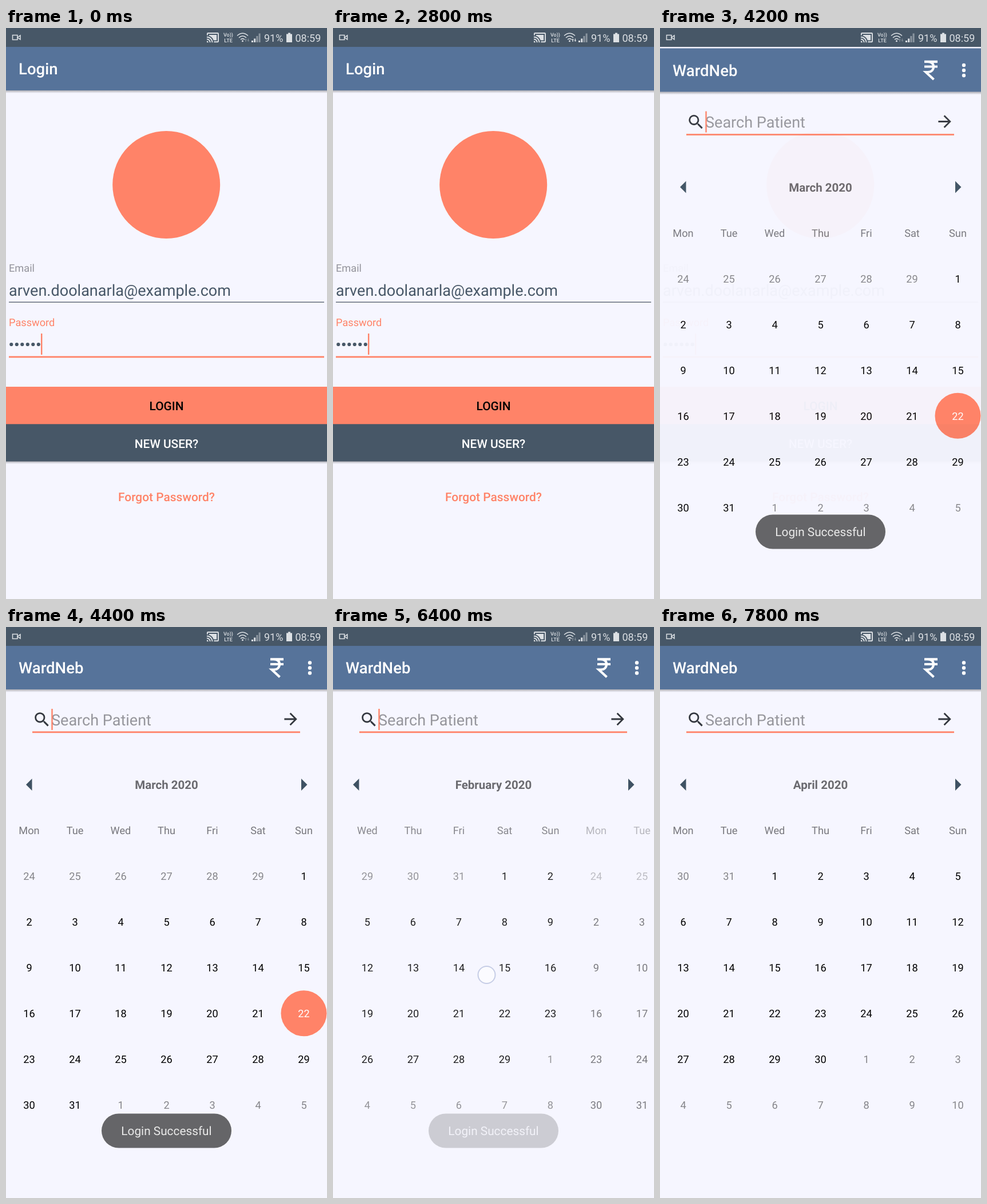
An HTML page that plays this animation: 561 px wide and 998 px high, repeating every 8 s.

```html
<!DOCTYPE html>
<html lang="en">
<head>
<meta charset="utf-8">
<title>Patient login and calendar</title>
<style>
  html, body { margin: 0; width: 100%; height: 100%; overflow: hidden; background: #f6f6ff; }
  svg { display: block; font-family: Roboto, sans-serif; text-rendering: geometricPrecision; }
  .bar { fill: #56739a; }
  .dark { fill: #475767; }
  .coral { fill: #ff8368; }
  .mid { text-anchor: middle; }
  .head { font-size: 27.5px; font-weight: 500; fill: #fff; }
  .btn { font-size: 20.9px; font-weight: 500; text-anchor: middle; }
  .small { font-size: 18.2px; }
  .input { font-size: 27.05px; }
  .stat { font-size: 18px; fill: #dce0e4; }
  .line { fill: none; stroke: #dce0e4; }
  .icon { fill: #dce0e4; }
</style>
</head>
<body>
<svg width="561" height="998" viewBox="0 0 561 998">
  <defs>
    <linearGradient id="shade" x2="0" y2="1">
      <stop stop-color="#000" stop-opacity=".3"/>
      <stop offset="1" stop-color="#000" stop-opacity="0"/>
    </linearGradient>
    <g id="appbar">
      <rect width="561" height="998" fill="#f6f6ff"/>
      <rect y="33" width="561" height="76" class="bar"/>
      <rect y="109" width="561" height="5" fill="url(#shade)"/>
    </g>
  </defs>

  <g id="login">
    <use href="#appbar"/>
    <text x="22" y="81.3" class="head">Login</text>
    <circle cx="280.2" cy="274" r="94" class="coral"/>
    <text x="5" y="426" class="small" fill="#93939b">Email</text>
    <text x="5" y="468" class="input" fill="#475767">arven.doolanarla@example.com</text>
    <rect x="5" y="478.5" width="551" height="1.4" fill="#5b6570"/>
    <text x="5" y="521" class="small coral">Password</text>
    <g id="dots" class="dark"></g>
    <rect id="passCaret" x="61" y="534" width="2.4" height="37" class="coral"/>
    <rect x="5" y="573.5" width="551" height="2.8" class="coral"/>
    <rect y="757" width="561" height="5" fill="url(#shade)"/>
    <rect y="627" width="561" height="66" class="coral"/>
    <rect y="692.3" width="561" height="65.2" class="dark"/>
    <text x="280.5" y="668" class="btn">LOGIN</text>
    <text x="280.5" y="733.5" class="btn" fill="#fff">NEW USER?</text>
    <text x="280.5" y="826.5" class="btn coral">Forgot Password?</text>
    <circle id="spinner" cx="280.5" cy="948.5" r="16.6" fill="none" stroke="#ff8368" stroke-width="3.6" pathLength="100"/>
  </g>

  <g id="home">
    <use href="#appbar"/>
    <text x="22" y="81.3" class="head">WardNeb</text>
    <path d="M462 56.3H485M462 65H485M462 56.3H468C475 56.3 478 60 478 65S475 74.5 468 74.5H464.5L478.5 87.5" fill="none" stroke="#fff" stroke-width="4.2"/>
    <g fill="#fff">
      <circle cx="531" cy="62.5" r="3.2"/><circle cx="531" cy="71.5" r="3.2"/><circle cx="531" cy="80.5" r="3.2"/>
    </g>
    <g fill="#33373e">
      <path transform="translate(46 145) scale(1.4)" d="M15.5 14h-.79l-.28-.27A6.47 6.47 0 0 0 16 9.5 6.5 6.5 0 1 0 9.5 16c1.61 0 3.09-.59 4.23-1.57l.27.28v.79l5 4.99L20.49 19l-4.99-5zm-6 0a4.5 4.5 0 1 1 0-9 4.5 4.5 0 0 1 0 9z"/>
      <path transform="translate(480.8 144.2) scale(1.4)" d="M12 4l-1.41 1.41L16.17 11H4v2h12.17l-5.58 5.59L12 20l8-8z"/>
    </g>
    <text x="79" y="171.5" class="input" fill="#96969c">Search Patient</text>
    <rect id="searchCaret" x="79.3" y="143" width="2.4" height="37" class="coral"/>
    <rect x="46" y="182.4" width="468" height="2.8" class="coral"/>
    <path d="M35 275.5L45.5 265V286ZM526.5 275.5L516 265V286Z" fill="#3f5263"/>
    <text id="month" x="280.5" y="283" class="mid" font-size="20.5" font-weight="700" fill="#6a6a6f"></text>
    <g id="pages"></g>
  </g>

  <g id="status">
    <rect width="561" height="33" class="dark"/>
    <path class="line" stroke-width="1.5" d="M11.5 12.500H20V20.500H11.5ZM20 16.5L25 13V20Z"/>
    <path class="icon" transform="translate(350 5.2) scale(.955)" d="M1 18v3h3c0-1.66-1.34-3-3-3zm0-4v2c2.76 0 5 2.24 5 5h2c0-3.87-3.13-7-7-7zm18-7H5v1.63c3.96 1.28 7.09 4.41 8.37 8.37H19V7zM1 10v2c4.97 0 9 4.03 9 9h2c0-6.08-4.93-11-11-11zm20-7H3c-1.1 0-2 .9-2 2v3h2V5h18v14h-7v2h7c1.1 0 2-.9 2-2V5c0-1.1-.9-2-2-2z"/>
    <g class="mid icon" font-size="9" font-weight="500">
      <text x="388.5" y="15">Vo))</text><text x="388.5" y="25">LTE</text>
    </g>
    <path class="line" stroke-width="1.5" d="M404 13.5Q413.5 5 423 13.5M407 17Q413.5 11 420 17M410 20.3Q413.5 17 417 20.3"/>
    <circle cx="413.5" cy="22.8" r="1.5" class="icon"/>
    <path id="traffic" d="M417 21L419 18.5 421 21H419.7V24H418.3V21ZM421.5 21.5H422.7V18.5H424.1V21.5H425.4L423.4 24Z"/>
    <path class="icon" d="M429 22h3v3h-3ZM433.2 18.5h3V25h-3Z"/>
    <path fill="#8c96a0" d="M437.4 14h3V25h-3ZM441.6 9.5h3V25h-3Z"/>
    <text x="451" y="24" class="stat">91%</text>
    <path class="icon" d="M493 8.5h4v2h3V25H490V10.5h3Z"/>
    <text x="505.5" y="24" class="stat">08:59</text>
  </g>

  <g id="toast">
    <rect x="167" y="850.5" width="227" height="60" rx="30" fill="#636365"/>
    <text x="280.5" y="888" class="mid" font-size="20.8" fill="#eaeaea">Login Successful</text>
  </g>
  <circle id="finger" r="15" fill="#fbfbff" stroke="#c6cde6" stroke-width="2"/>
</svg>

<script>
const LOOP = 8000, PAGE = 560;
const $ = id => document.getElementById(id);
const ramp = (t, a, b) => Math.min(1, Math.max(0, (t - a) / (b - a)));
const easeOut = (x, n) => 1 - (1 - x) ** n;
const show = (el, on) => el.setAttribute('visibility', on ? 'inherit' : 'hidden');
const fade = (el, a) => el.setAttribute('opacity', a);
const move = (el, x, y) => el.setAttribute('transform', `translate(${x} ${y})`);

function add(parent, tag, attrs, text = '') {
  const el = document.createElementNS('http://www.w3.org/2000/svg', tag);
  for (const k in attrs) el.setAttribute(k, attrs[k]);
  el.textContent = text;
  parent.append(el);
  return el;
}

for (let i = 0; i < 6; i++) add($('dots'), 'circle', { cx: 9.3 + i * 9.5, cy: 553, r: 3.1 });

// Month pages, Monday first, six weeks each
const months = ['February', 'March', 'April'];
const weekdays = ['Mon', 'Tue', 'Wed', 'Thu', 'Fri', 'Sat', 'Sun'];
const pages = months.map((name, k) => {
  const page = add($('pages'), 'g', {});
  const month = k + 1;
  const lead = (new Date(2020, month, 1).getDay() + 6) % 7;
  const label = (i, y, fill, text) =>
    add(page, 'text', { x: 40.5 + 80 * (i % 7), y, fill, class: 'small mid' }, text);
  weekdays.forEach((d, i) => label(i, 362, '#77777c', d));
  for (let i = 0; i < 42; i++) {
    const date = new Date(2020, month, 1 - lead + i), day = date.getDate();
    const inside = date.getMonth() === month;
    const picked = inside && month === 2 && day === 22;
    const y = 442.3 + 80 * Math.floor(i / 7);
    if (picked) add(page, 'circle', { cx: 520.5, cy: y - 7, r: 40, class: 'coral' });
    label(i, y, picked ? '#fff' : inside ? '#000' : '#858589', day);
  }
  return page;
});

// Drag from one page position to another, then settle; the finger follows the page
const swipes = [
  { start: 5160, release: 5400, settled: 5800, turn: 5365, from: 1, drag: .4625, to: 0, x: 129, y: 620 },
  { start: 6180, release: 6520, settled: 6950, turn: 6520, from: 0, drag: .386, to: 1, x: 409, y: 608 },
  { start: 7130, release: 7330, settled: 7740, turn: 7330, from: 1, drag: 1.5, to: 2, x: 410, y: 612 }
];

function drawCalendar(t) {
  let pos = 1, finger = null, title = 1, shift = 0, alpha = 1;
  for (const s of swipes) {
    if (t >= s.start) {
      pos = s.from + (s.drag - s.from) * ramp(t, s.start, s.release);
      if (t <= s.release + 20) finger = [s.x - PAGE * (pos - s.from), s.y];
      pos += (s.to - s.drag) * easeOut(ramp(t, s.release, s.settled), 3);
    }
    if (t >= s.turn) {
      const dir = s.from - s.to, half = 250, out = t < s.turn + half;
      const e = easeOut(ramp(t, s.turn + (out ? 0 : half), s.turn + (out ? half : 2 * half)), 4);
      title = out ? s.from : s.to;
      shift = 31 * dir * (out ? e : e - 1);
      alpha = out ? 1 - e : e;
    }
  }
  pages.forEach((page, k) => {
    const d = k - pos;
    show(page, Math.abs(d) < 1);
    fade(page, Math.sqrt(Math.max(0, 1 - Math.abs(d))));
    move(page, d * PAGE, 0);
  });
  $('month').textContent = months[title] + ' 2020';
  move($('month'), 0, shift);
  fade($('month'), alpha);
  return finger;
}

function drawSpinner(t) {
  const el = $('spinner'), u = (t - 300) / 1333;
  const wave = .5 - .5 * Math.cos(2 * Math.PI * u);
  const len = 6 + 66 * wave;
  el.setAttribute('stroke-dasharray', `${len} ${100 - len}`);
  el.setAttribute('transform', `rotate(${u * 500 - 90} 280.5 948.5)`);
  show(el, t >= 300 && t < 2700);
}

function draw(t) {
  const blink = shift => (t + shift) % 1000 < 500;
  show($('passCaret'), t >= 2600 || blink(400));
  show($('searchCaret'), blink(900));
  $('traffic').setAttribute('fill', t >= 600 && t < 4000 ? '#dce0e4' : '#7f8a95');
  drawSpinner(t);

  const enter = easeOut(ramp(t, 4030, 4280), 3);
  show($('home'), enter > 0);
  fade($('home'), enter);
  move($('home'), 0, 80 * (1 - enter));

  fade($('toast'), Math.min(ramp(t, 3925, 4180), 1 - ramp(t, 6270, 6453)) * .98);

  let finger = drawCalendar(t);
  if (t >= 150 && t < 350) finger = [330, 660];
  show($('finger'), finger);
  if (finger) move($('finger'), ...finger);
}

function tick() {
  draw(performance.now() % LOOP);
  requestAnimationFrame(tick);
}
tick();
</script>
</body>
</html>
```
